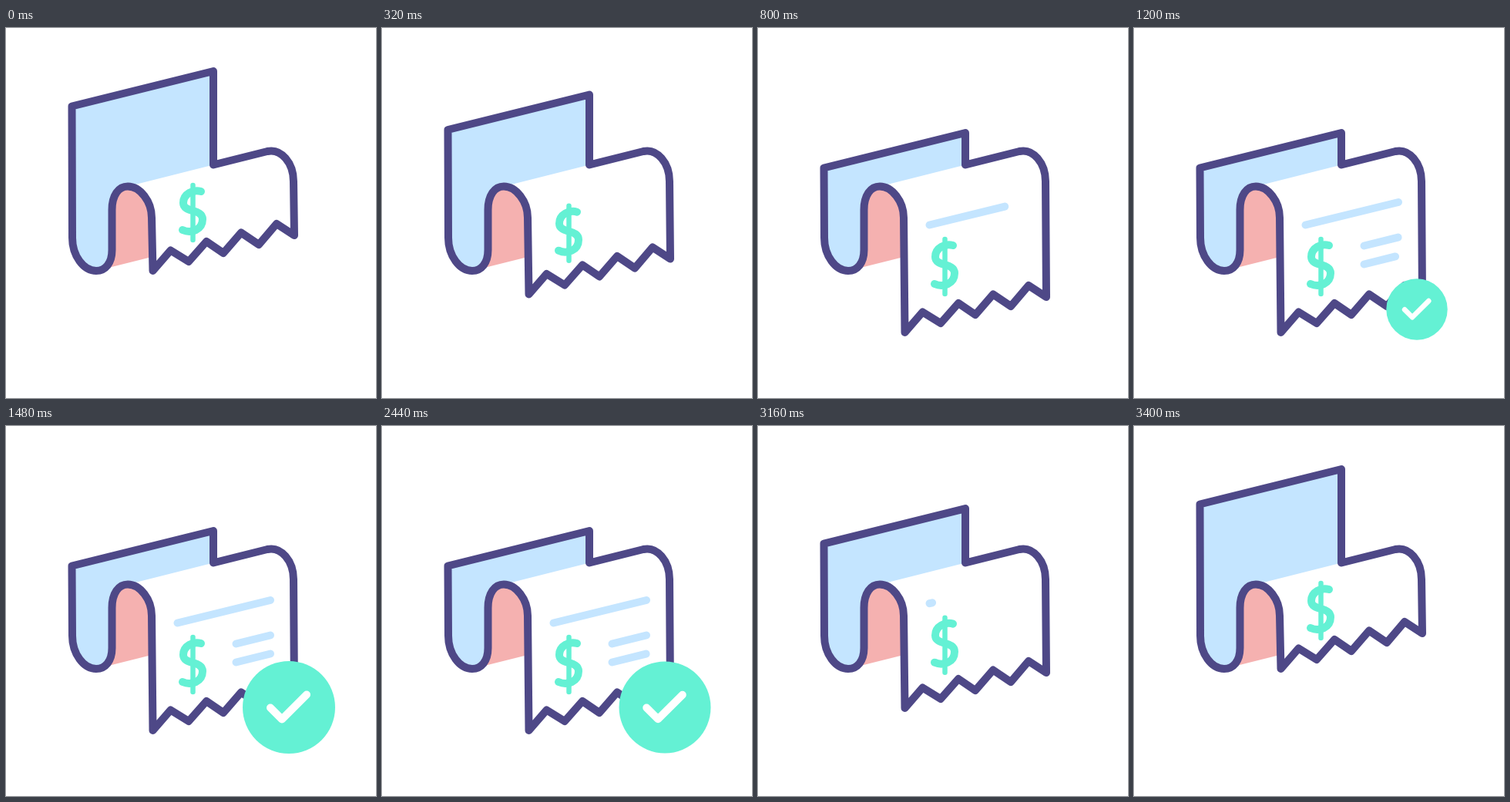
These frames come from a looping animation (480 px wide and 480 px high, 3.48 s). An HTML page:

```html
<!DOCTYPE html>
<html lang="en">
<head>
<meta charset="utf-8">
<title>Receipt</title>
<style>
  html, body { margin: 0; width: 100%; height: 100%; overflow: hidden; background: #fff; }
  svg { display: block; width: 100vw; height: 100vh; fill: none; stroke-width: 10; stroke-linecap: round; stroke-linejoin: round; }
</style>
</head>
<body>
<svg viewBox="0 0 480 480">
  <path id="back" fill="#c4e5ff"/>
  <path fill="#f5b1b0" d="M117 315C129 315 137.500 305 137.500 288V236C137.500 217 146 205.500 158 205.500C174 205.500 189 225 189 246V297Z"/>
  <path id="outline" stroke="#4e4887"/>
  <g id="print">
    <g stroke="#64f1d4">
      <path stroke-width="6.500" d="M242.500 204V275"/>
      <path d="M253 212C243 209 230 215 230 227C230 240 255 234 255 248C255 262 240 267 229 262"/>
    </g>
    <g stroke="#c4e5ff">
      <path class="rule"/>
      <path class="rule"/>
      <path class="rule"/>
    </g>
  </g>
  <g id="badge">
    <circle r="60" fill="#64f1d4"/>
    <path stroke="#fff" d="M-24 .5L-9 15.500L23 -16.500"/>
  </g>
</svg>
<script>
  const LOOP = 3480, TRAVEL = 80, PRINT_TRAVEL = 70;
  const $ = id => document.getElementById(id);
  const clamp = x => Math.min(1, Math.max(0, x));

  // Decelerates in, holds, then accelerates out.
  function phase(t, inStart, inEnd, outStart, outEnd, power = 2) {
    if (t < 2000) return 1 - (1 - clamp((t - inStart) / (inEnd - inStart))) ** power;
    return 1 - clamp((t - outStart) / (outEnd - outStart)) ** 2;
  }

  const rules = [
    { x: 222.5, y: 185.5, w: 120.5, h: -29.5, times: [454, 1068, 2570, 3170] },
    { x: 298.5, y: 212.5, w: 44.5, h: -11, times: [840, 1240, 2440, 2860] },
    { x: 298.5, y: 236.5, w: 44.5, h: -11, times: [920, 1320, 2400, 2820] }
  ];
  const ruleNodes = document.querySelectorAll('.rule');

  const teeth = [[190.5, 315], [213.5, 288.5], [237, 303], [260, 277], [282, 292],
    [305, 265.5], [328, 281], [351, 254], [374, 269]];
  const fold = 'C86 296 101 315 117 315C129 315 137.5 305 137.5 288V236' +
    'C137.5 217 146 205.5 158 205.5';

  function draw(t) {
    const p = phase(t, 200, 800, 2800, 3400, 2.13);
    const d = p * TRAVEL;
    const sheet = `M269 177.5V${56 + d}L85.5 ${101.5 + d}L86 272${fold}`;
    const edge = teeth.map(([x, y]) => `L${x} ${y + d}`).join('');

    $('back').setAttribute('d', sheet + 'Z');
    $('outline').setAttribute('d',
      `${sheet}C174 205.5 189 225 189 246${edge}L373 199C373 175 357 156 339 160Z`);
    $('print').setAttribute('transform', `translate(0 ${p * PRINT_TRAVEL})`);

    rules.forEach(({ x, y, w, h, times }, i) => {
      const k = phase(t, ...times);
      ruleNodes[i].setAttribute('d', k > 0 ? `M${x} ${y}l${w * k} ${h * k}` : '');
    });

    const scale = phase(t, 1000, 1480, 2400, 2840);
    $('badge').setAttribute('transform', `translate(367 365) scale(${scale})`);
    $('badge').style.display = scale > 0 ? '' : 'none';
  }

  const start = performance.now();
  function tick() {
    draw((performance.now() - start) % LOOP);
    requestAnimationFrame(tick);
  }
  tick();
</script>
</body>
</html>
```
